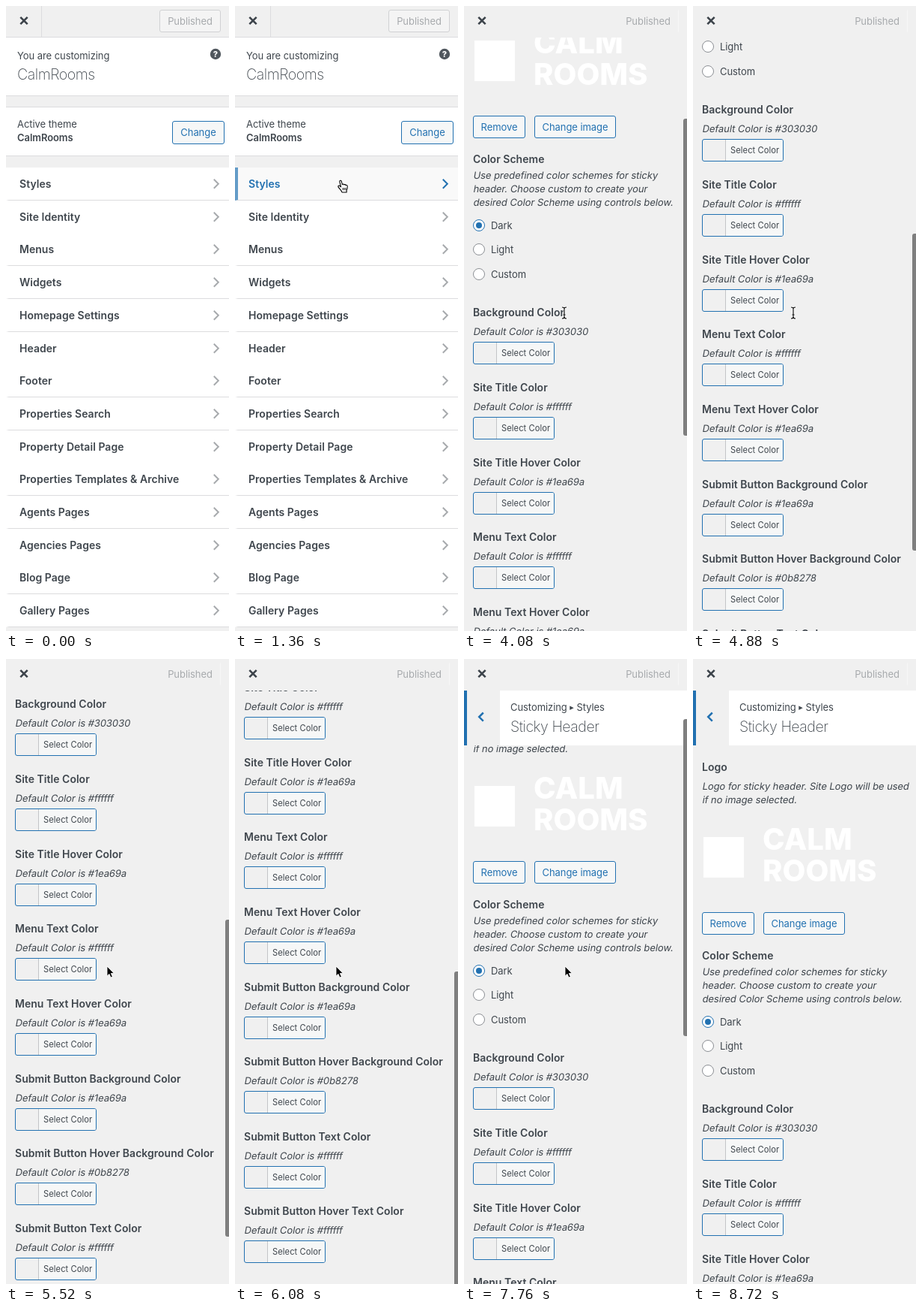
An HTML page that plays this animation: 298x832 px, repeating every 8960 ms.

```html
<!DOCTYPE html>
<html lang="en">
<head>
<meta charset="utf-8">
<title>Customizer</title>
<style>
:root { --bg: #f0f0f0; --blue: #2271b1; --line: #dcdcde; --ink: #3f464d; }
html, body { margin: 0; width: 100%; height: 100%; overflow: hidden; background: var(--bg); }
body { font: 13px/20px Inter, sans-serif; letter-spacing: -.005em; color: var(--ink); }
#stage { position: relative; width: 298px; height: 832px; overflow: hidden; background: var(--bg); }
#stage * { position: absolute; box-sizing: border-box; }
.panel { left: 0; top: 0; width: 298px; height: 832px; }
.view { left: 0; top: 42px; width: 298px; height: 790px; overflow: hidden; }
#content { left: 0; top: -42px; width: 298px; height: 1493px; }
.white { background: #fff; }
.rule { background: var(--line); }
.t { line-height: 20px; height: 20px; white-space: pre; }
.b { font-weight: 600; }
.label { font-weight: 600; font-size: 14px; letter-spacing: .002em; white-space: pre; }
.title { font-size: 19.6px; font-weight: 200; letter-spacing: -.025em; }
.i { transform: skewX(-10deg); transform-origin: 0 14.7px; }
.small { font-size: 11.2px; letter-spacing: .005em; white-space: pre; }
#stage .sep { position: static; font-size: 11px; line-height: 1; vertical-align: 1px; }
.btn { border: 1px solid var(--blue); border-radius: 3px; background: #f6f7f7; color: var(--blue); text-align: center; }
.row { left: 0; width: 298px; height: 44px; background: #fff; border-left: 4px solid #fff; border-bottom: 1px solid var(--line); }
.row span { left: 14px; top: 11px; line-height: 21px; }
svg { left: 0; top: 0; overflow: visible; fill: none; }
.row svg { left: 271px; top: 14px; }
#bar { left: 0; top: 0; width: 298px; height: 42px; background: var(--bg); border-bottom: 1px solid var(--line); }
#cell { left: 0; top: 0; width: 48px; height: 41px; border-right: 1px solid var(--line); }
#pub { left: 205px; top: 5px; width: 82px; height: 30px; line-height: 29px; text-align: center; color: #a7aaad; border: 1px solid #d0d1d3; border-radius: 3px; background: #f4f4f4; }
#bar.flat, #bar.flat #cell { border-color: transparent; }
#bar.flat #pub { background: none; border-color: transparent #f7f7f7 transparent transparent; border-radius: 0; }
.back { left: 0; top: 0; width: 48px; background: var(--bg); border-left: 4px solid var(--blue); }
.radio { left: 12px; width: 16px; height: 16px; border: 1px solid #8c8f94; border-radius: 50%; background: #fff; }
.radio.on { border-color: var(--blue); }
.radio.on::after { content: ""; position: absolute; left: 3px; top: 3px; width: 8px; height: 8px; border-radius: 50%; background: var(--blue); }
.pick { left: 12px; width: 109px; height: 30px; border: 1px solid var(--blue); border-radius: 3px; background: var(--bg); }
.pick span { left: 30px; top: 0; width: 77px; height: 28px; padding-left: 6px; line-height: 28px; border-left: 1px solid #c3c4c7; border-radius: 0 2px 2px 0; background: #f6f7f7; }
.word { left: 93px; font-weight: 800; font-size: 40px; line-height: 40px; letter-spacing: 0; color: #fff; }
#thumb { left: 293px; width: 8px; height: 422px; border-radius: 3px; background: #7f7f7f; }
#cursor { width: 20px; height: 20px; }
</style>
</head>
<body>
<div id="stage">
  <div class="panel" id="root"></div>
  <div class="panel" id="styles"></div>
  <div class="panel" id="sticky"></div>
  <div id="thumb"></div>
  <div id="bar">
    <div id="cell"></div>
    <svg width="48" height="41" stroke="#3c434a" stroke-width="2.6"><path d="M19.3 14.8l9.4 9.4M28.7 14.8l-9.4 9.4"/></svg>
    <div id="pub">Published</div>
  </div>
  <svg id="cursor">
    <g id="arrow"><path d="M0 0v13.2l3-2.8 2 4.7 2.4-1-2-4.5h4z" fill="#000" stroke="#fff" stroke-width=".9"/></g>
    <g id="hand" stroke="#000" stroke-width="1.1" stroke-linejoin="round" transform="translate(-4.6 -1)">
      <path d="M5.2 9.8L3.4 2.8C3.1 1.1 5.3.6 5.8 2.2L7 6.8C7.5 5.7 9 5.8 9.3 7C10 6.2 11.3 6.6 11.5 7.7C12.3 7 13.7 7.5 13.8 8.8C14 11 13.7 12.6 12.7 14.3V17H6.6C6.2 14.6 3.2 12.4 1.6 9.9C.9 8.5 2.5 7.6 3.6 8.4Z" fill="#fff"/>
      <path d="M7.8 11v3.2M9.7 11v3.2M11.6 11v3.2" stroke-width=".9"/>
    </g>
    <g id="beam">
      <path d="M-3-7Q0-7 0-5V6Q0 8-3 8M3-7Q0-7 0-5V6Q0 8 3 8M-1.5 3h3" stroke="#fff" stroke-width="2.6"/>
      <path d="M-3-7Q0-7 0-5V6Q0 8-3 8M3-7Q0-7 0-5V6Q0 8 3 8M-1.5 3h3" stroke="#111" stroke-width="1.2"/>
    </g>
  </svg>
</div>
<script>
const $ = id => document.getElementById(id);
const LOOP = 8960, STEP = 80, W = 298, PITCH = 43.7, MAX = 661, HEAD = 73;
const BRAND = 'CalmRooms';

// Markup helpers; y is the middle of the text line.
const text = (x, y, s, cls = '') => `<div class="t ${cls}" style="left:${x}px;top:${y - 10}px">${s}</div>`;
const box = (x, y, w, h, cls, s = '') =>
  `<div class="${cls}" style="left:${x}px;top:${y}px;width:${w}px;height:${h}px;line-height:${h - 2}px">${s}</div>`;
const chevron = '<svg width="16" height="16" stroke="#a7aaad" stroke-width="2"><path d="M2.8 1.8l6 6-6 6"/></svg>';
const rows = (top, names) => names.map((n, i) =>
  `<div class="row" style="top:${(top + i * PITCH).toFixed(1)}px"><span class="label">${n}</span>${chevron}</div>`).join('');
const card = (y, h) => box(0, y, W, h, 'white') + box(0, y - 1, W, 1, 'rule') + box(0, y + h, W, 1, 'rule');
const backCell = h => `<div class="back" style="height:${h}px">
  <svg width="44" height="70" stroke="#2271b1" stroke-width="2.5"><path d="M21.8 29.5l-5.6 5.6 5.6 5.6"/></svg></div>`;

$('root').innerHTML =
  card(42, 77) + text(15, 66, 'You are customizing') + text(15, 91, BRAND, 'title') +
  `<svg style="left:272px;top:56px" width="16" height="16"><circle cx="8" cy="8" r="7.2" fill="#50575e"/>
   <text x="8" y="12" text-anchor="middle" font-size="11" font-weight="800" fill="#fff">?</text></svg>` +
  card(135, 64) + text(15, 157, 'Active theme') + text(15, 175, BRAND, 'b') +
  box(222, 153, 70, 31, 'btn', 'Change') +
  rows(215, ['Styles', 'Site Identity', 'Menus', 'Widgets', 'Homepage Settings', 'Header', 'Footer',
    'Properties Search', 'Property Detail Page', 'Properties Templates &amp; Archive',
    'Agents Pages', 'Agencies Pages', 'Blog Page', 'Gallery Pages']);

$('styles').innerHTML =
  card(42, 70) + `<div style="left:0;top:42px">${backCell(70)}</div>` + box(47, 42, 1, 70, 'rule') +
  text(62, 64, 'You are customizing') + text(62, 89, 'Styles', 'title') + box(0, 128, W, 1, 'rule') +
  rows(129.3, ['Background Image', 'Default or Custom', 'Typography', 'Core Colors', 'Round Corners', 'Header',
    'Sticky Header', 'Slider', 'Search Form', 'Banner', 'Home Page', 'Property Item', 'Buttons', 'News',
    'Gallery', 'Footer']);

const picks = [['Background', '303030'], ['Site Title', 'ffffff'], ['Site Title Hover', '1ea69a'],
  ['Menu Text', 'ffffff'], ['Menu Text Hover', '1ea69a'], ['Submit Button Background', '1ea69a'],
  ['Submit Button Hover Background', '0b8278'], ['Submit Button Text', 'ffffff'],
  ['Submit Button Hover Text', 'ffffff']];

const pickHtml = ([name, hex], i) => {
  const y = Math.round(599.4 + i * 99.63);
  return text(12, y, name + ' Color', 'label') + text(12, y + 25, 'Default Color is #' + hex, 'i') +
    `<div class="pick" style="top:${y + 39}px"><span class="small">Select Color</span></div>`;
};
const radioHtml = (name, i) =>
  `<div class="radio ${i ? '' : 'on'}" style="top:${Math.round(474.5 + i * 32.8)}px"></div>` +
  text(36, 482.5 + i * 32.8, name);

$('sticky').innerHTML = `<div class="view"><div id="content">` +
  text(12, 144, 'Logo', 'label') +
  text(12, 169, 'Logo for sticky header. Site Logo will be used', 'i') +
  text(12, 187, 'if no image selected.', 'i') +
  box(14, 237, 54, 54, 'white') +
  '<div class="word" style="top:220px">CALM</div><div class="word" style="top:262px">ROOMS</div>' +
  box(12, 337, 70, 30, 'btn', 'Remove') + box(94, 337, 109, 30, 'btn', 'Change image') +
  text(12, 395, 'Color Scheme', 'label') +
  ['Use predefined color schemes for sticky', 'header. Choose custom to create your',
    'desired Color Scheme using controls below.'].map((s, i) => text(12, 415.5 + i * 18.4, s, 'i')).join('') +
  ['Dark', 'Light', 'Custom'].map(radioHtml).join('') + picks.map(pickHtml).join('') +
  `</div><div id="head" class="white" style="left:0;top:0;width:${W}px;height:${HEAD}px">` + backCell(HEAD) +
  text(62, 22, 'Customizing <span class="sep">▸</span> Styles') +
  text(62, 48, 'Sticky Header', 'title') + '</div></div>';

// Motion
const clamp = v => Math.max(0, Math.min(1, v));
const ease = v => (v = clamp(v), v < .5 ? 4 * v ** 3 : 1 - (2 - 2 * v) ** 3 / 2);
const track = (pts, t) => {
  const i = pts.findIndex(p => p[0] > t);
  if (i === 0) return pts[0].slice(1);
  if (i < 0) return pts[pts.length - 1].slice(1);
  const a = pts[i - 1], b = pts[i], k = (t - a[0]) / (b[0] - a[0]);
  return a.slice(1).map((v, j) => v + (b[j + 1] - v) * k);
};
const pointer = [[640, 216, 479], [880, 172, 330], [1120, 143, 234], [1200, 143, 234], [1360, 141, 232],
  [2160, 141, 232], [2480, 140, 265], [2640, 139.6, 323], [2960, 135, 408], [3120, 134, 408],
  [5200, 134, 408], [5280, 135, 409]];
const scroll = [[3600, 0], [3760, 22], [4080, 191], [4480, 352], [4880, 461], [5120, 478], [5200, 478],
  [5360, 495], [5760, 606], [6080, MAX], [6160, MAX], [6320, 635], [6720, 460], [7120, 282.4], [7520, 125],
  [7920, 30], [8000, 30], [8320, 0]];

const rootRows = [...$('root').querySelectorAll('.row')];
const styleRows = [...$('styles').querySelectorAll('.row')];
const rootHot = t => t >= 1260 ? 0 : -1;
const styleHot = t => t < 2060 ? -1 : Math.floor((track(pointer, t)[1] - 129.3) / PITCH);

const mix = (a, b, k) => `rgb(${a.map((v, i) => Math.round(v + (b[i] - v) * k))})`;
const BLUE = [34, 113, 177], INK = [63, 70, 77], WHITE = [255, 255, 255], SOFT = [246, 247, 247];

// Highlight fades linearly over 150 ms; the chevron switches at once.
function paintRows(list, hot, t) {
  list.forEach((row, i) => {
    let k = 0;
    for (let n = 0; n < 10; n++) k += (hot(t - n * 15) === i) / 10;
    row.style.borderLeftColor = mix(WHITE, BLUE, k);
    row.style.backgroundColor = mix(WHITE, SOFT, k);
    row.firstChild.style.color = mix(INK, BLUE, Math.min(1, k * 1.6));
    row.lastChild.setAttribute('stroke', hot(t) === i ? '#2271b1' : '#a7aaad');
  });
}

const slide = (el, x) => el.style.transform = `translateX(${x.toFixed(1)}px)`;

function draw(t) {
  const k1 = ease((t - 1800) / 240), k2 = ease((t - 3090) / 270);
  slide($('root'), -W * k1);
  slide($('styles'), W * (1 - k1 - k2));
  slide($('sticky'), W * (1 - k2));
  $('bar').className = t >= 3120 ? 'flat' : '';
  paintRows(rootRows, rootHot, t);
  paintRows(styleRows, styleHot, t);

  const s = Math.round(track(scroll, t)[0]);
  $('content').style.transform = `translateY(${-s}px)`;
  // The heading leaves with the page and returns once scrolling turns upwards.
  const head = t <= 6160 ? -s : Math.min(0, MAX - HEAD - s);
  $('head').style.transform = `translateY(${head}px)`;
  $('thumb').style.top = 42 + .566 * s + 'px';
  $('thumb').style.opacity = t < 3680 || t >= 8720 ? 0 : t >= 8640 ? .5 : 1;

  const [x, y] = track(pointer, t);
  const kind = t < 640 || t >= 8720 ? '' : t < 1280 || t >= 5280 ? 'arrow' : t < 3280 ? 'hand' : 'beam';
  $('cursor').style.transform = `translate(${x}px,${y}px)`;
  for (const id of ['arrow', 'hand', 'beam']) $(id).style.display = id === kind ? '' : 'none';
}

const start = performance.now();
function tick() {
  const t = (performance.now() - start) % LOOP;
  draw(Math.floor(t / STEP) * STEP);
  requestAnimationFrame(tick);
}
tick();
</script>
</body>
</html>
```
